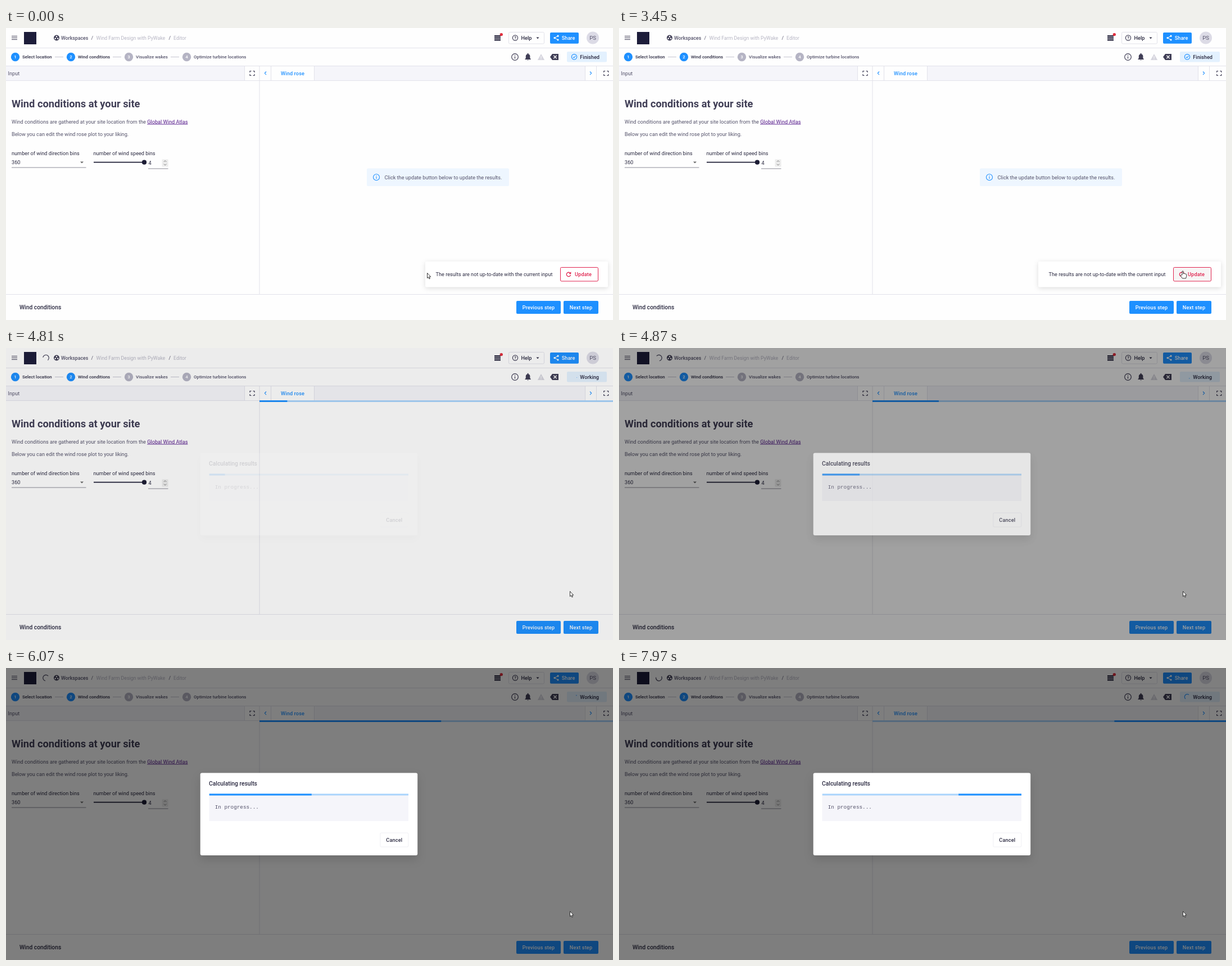
An HTML page for the animation above (8000 ms loop, 1080x519 px).

```html
<!DOCTYPE html>
<html lang="en">
<head>
<meta charset="utf-8">
<title>Wind conditions</title>
<style>
html, body { margin: 0; width: 100%; height: 100%; overflow: hidden; background: #fefefe; }
svg { display: block; width: 100vw; height: 100vh; --dim: 0; }
text { font: 400 9.17px Roboto, sans-serif; fill: #2a2940; white-space: pre; }
.m { font-weight: 500; }
.crumb { font-size: 8.75px; }
.step { font-size: 7.95px; font-weight: 500; }
.head { font-size: 10.3px; font-weight: 500; }
.para { font-size: 9.2px; }
.btn { font-weight: 500; letter-spacing: .13px; }
.mid { text-anchor: middle; }
.soft { fill: #55536b; }
.pale { fill: #b7b6c4; }
.white { fill: #fff; }
.blue { fill: #1e90ff; }
.red { fill: #e0234e; }
.dark { fill: #403e56; }
.line { fill: none; stroke: #403e56; stroke-width: 1.2; }
.edge { fill: none; stroke: #e2e2ea; }
.bline { fill: none; stroke: #1e90ff; stroke-width: 1.1; }
.track { fill: #a9d4fc; }
#shade { opacity: calc(.5 * var(--dim)); }
#modal { opacity: var(--dim); }
#card { filter: drop-shadow(0 7px 8px #0002); }
#toast { filter: drop-shadow(0 2px 4px #0002); }
</style>
</head>
<body>
<svg viewBox="0 0 1080 519" preserveAspectRatio="none">
  <rect width="1080" height="519" fill="#fefefe"/>

  <!-- header -->
  <path class="line" d="M10 14.5h10M10 17.5h10M10 20.5h10"/>
  <rect x="32" y="7" width="22" height="22" fill="#1d1d3a"/>
  <circle class="dark" cx="90" cy="17.5" r="5"/>
  <g class="white"><circle cx="90" cy="15.2" r="1.3"/><circle cx="87.8" cy="18.8" r="1.3"/><circle cx="92.2" cy="18.8" r="1.3"/></g>
  <text class="crumb m soft" x="98" y="20.7">Workspaces</text>
  <text class="crumb soft" x="151.5" y="20.7">/</text>
  <text class="crumb pale" x="160.5" y="20.7">Wind Farm Design with PyWake</text>
  <text class="crumb soft" x="289.5" y="20.7">/</text>
  <text class="crumb pale" x="298" y="20.7">Editor</text>
  <path fill="none" stroke="#2a2940" stroke-width="2.4" d="M869 14.3h11M869 17.8h11M869 21.3h11"/>
  <circle cx="881.3" cy="11.6" r="2.7" fill="#e0303f"/>
  <rect class="edge" x="894.5" y="7.5" width="63" height="20.5" rx="2"/>
  <circle class="line" cx="906" cy="17.5" r="4.6"/>
  <text class="m mid" x="906" y="20.2" style="font-size:7.5px">?</text>
  <text class="m" x="916.5" y="20.8">Help</text>
  <path fill="#2a2940" d="M943.5 16.5h5l-2.500 2.700z"/>
  <rect class="blue" x="968" y="8" width="51" height="19.8" rx="2"/>
  <path fill="none" stroke="#fff" d="M982 14.2l-6 3.4 6 3.4"/>
  <g class="white"><circle cx="976" cy="17.6" r="1.6"/><circle cx="982" cy="14.2" r="1.6"/><circle cx="982" cy="21" r="1.6"/></g>
  <text class="m white" x="988.8" y="20.8">Share</text>
  <circle cx="1044" cy="17.5" r="11" fill="#dcdbe6"/>
  <text class="mid soft" x="1044" y="21" style="font-size:9.6px">PS</text>
  <path class="edge" d="M0 35.5H1080M0 67.5H1080"/>

  <!-- stepper -->
  <path fill="none" stroke="#c4c3cf" d="M87 51.5h15M190 51.5h15M293 51.5h15"/>
  <g class="blue"><circle cx="16.5" cy="51.5" r="7.7"/><circle cx="115.5" cy="51.5" r="7.7"/></g>
  <g fill="#b5b4c4"><circle cx="218.5" cy="51.5" r="7.7"/><circle cx="321.5" cy="51.5" r="7.7"/></g>
  <text class="step mid white" x="16.5" y="54.4">1</text>
  <text class="step mid white" x="115.5" y="54.4">2</text>
  <text class="step mid white" x="218.5" y="54.4">3</text>
  <text class="step mid white" x="321.5" y="54.4">4</text>
  <text class="step" x="29" y="54.4">Select location</text>
  <text class="step" x="128" y="54.4">Wind conditions</text>
  <text class="step soft" x="231" y="54.4">Visualize wakes</text>
  <text class="step soft" x="334" y="54.4">Optimize turbine locations</text>
  <circle class="line" cx="905.5" cy="51.5" r="5.8"/>
  <path class="line" d="M905.5 50.5v4M905.5 48v1.3"/>
  <path class="dark" d="M923.5 56v-1l1.3-1.3v-3.4q0-3.2 2.8-3.9v-.6a1 1 0 0 1 2 0v.6q2.8.7 2.8 3.9v3.4l1.3 1.3v1zM927.3 56.7h2.5q-1.2 2-2.5 0z"/>
  <path fill="#d6d5de" d="M952 46l6.2 11h-12.4z"/>
  <path stroke="#fff" d="M952 50v3.5M952 54.5v1.3"/>
  <path class="dark" d="M972 46h11v11h-11l-4-5.5z"/>
  <path stroke="#fff" stroke-width="1.3" d="M974.3 48.8l5.4 5.4M979.7 48.8l-5.4 5.4"/>
  <rect x="998" y="42" width="71" height="18.5" rx="2" fill="#e3f1fe"/>
  <text class="m" id="status" x="1021.3" y="54.7">Finished</text>

  <!-- panel bars -->
  <path fill="#f5f5fa" d="M0 68h425v25H0zM549 68h481v25H549z"/>
  <path class="edge" d="M0 93.5H1080M451 68V473M424.5 68v25M471.5 68v25M548.5 68v25M1030.5 68v25M1050.5 68v25M0 473.5H1080"/>
  <text class="soft" x="3.5" y="83.8">Input</text>
  <path id="full" class="line" d="M434 79v-2.5h2.5M439.5 76.5h2.5v2.5M442 82v2.5h-2.5M436.5 84.5h-2.5v-2.5"/>
  <use href="#full" x="629.7"/>
  <path class="bline" d="M463 77.5l-2.7 2.8 2.7 2.8M1039 77.5l2.7 2.8-2.7 2.8"/>
  <text class="btn blue" x="489" y="83.8">Wind rose</text>

  <!-- input form -->
  <text class="dark" x="10" y="141" style="font-size:18.3px;font-weight:700">Wind conditions at your site</text>
  <text class="para soft" x="10" y="169.6">Wind conditions are gathered at your site location from the <tspan fill="#551a8b" text-decoration="underline">Global Wind Atlas</tspan></text>
  <text class="para soft" x="10" y="191.6">Below you can edit the wind rose plot to your liking.</text>
  <text x="10" y="226.3">number of wind direction bins</text>
  <text x="155.5" y="226.3">number of wind speed bins</text>
  <text x="10" y="241.8">360</text>
  <path fill="#666" d="M132 237.5h6l-3 3z"/>
  <path fill="none" stroke="#8b8a96" d="M10 248h132.5M253 250h35.5"/>
  <path stroke="#1d1d35" stroke-width="1.8" d="M156 238.7h90"/>
  <circle cx="246" cy="238.7" r="4.1" fill="#1d1d35"/>
  <text x="253.5" y="242.8">4</text>
  <rect x="277.5" y="233.5" width="11" height="13" fill="#ececec"/>
  <path fill="none" stroke="#777" stroke-width=".9" d="M280.8 238l2.3-2.3 2.3 2.3M280.8 241.7l2.3 2.3 2.3-2.3"/>

  <!-- footer -->
  <text class="head" x="24" y="500.2">Wind conditions</text>
  <rect class="blue" x="908" y="485" width="79" height="23" rx="2"/>
  <rect class="blue" x="992" y="485" width="62" height="23" rx="2"/>
  <text class="btn mid white" x="947.5" y="499.8">Previous step</text>
  <text class="btn mid white" x="1023" y="499.8">Next step</text>

  <g id="idle">
    <g class="bline"><circle cx="1011" cy="51.3" r="4.7"/><path d="M1008.8 51.3l1.7 1.7 3-3.3"/></g>
    <rect x="642" y="249.5" width="253" height="31.5" rx="2" fill="#eef6ff"/>
    <circle class="bline" cx="659" cy="265.3" r="5.5"/>
    <path class="bline" d="M659 264.5v3.6M659 262.2v1.2"/>
    <text class="soft" x="673.5" y="268.5">Click the update button below to update the results.</text>
    <rect id="toast" x="746" y="415" width="325" height="45.5" rx="2" fill="#fff"/>
    <text x="764.5" y="441.3">The results are not up-to-date with the current input</text>
    <rect id="update" x="986.5" y="425.5" width="67" height="24.5" rx="2" stroke="#e0234e" fill="#fff"/>
    <path fill="none" stroke="#e0234e" stroke-width="1.3" d="M1003.9 435.6a3.7 3.7 0 1 0 .7 3.3"/>
    <path class="red" d="M1005.3 433.2v4h-4z"/>
    <text class="btn red" x="1012" y="441.3">Update</text>
  </g>

  <g id="busy">
    <path id="turn" class="line" stroke-linecap="round"/>
    <circle id="arc" class="bline" cx="1011" cy="51.3" r="4.7" pathLength="126.9"/>
    <g class="bar" data-x="451" data-w="629" transform="translate(0 93)"></g>
  </g>

  <rect id="shade" width="1080" height="519"/>

  <g id="modal">
    <rect id="card" x="345.7" y="186.5" width="386.5" height="146.5" rx="3" fill="#fff"/>
    <text class="head" x="361" y="208.5">Calculating results</text>
    <rect x="361.5" y="226" width="354.5" height="46" fill="#f5f5fa"/>
    <g class="bar" data-x="361.7" data-w="354.3" transform="translate(0 223.5)"></g>
    <text class="soft" x="371.7" y="250.3" style="font:9.3px 'Liberation Mono',monospace">In progress...</text>
    <rect class="edge" x="665.8" y="293" width="50" height="25" rx="2" style="stroke:#efeff4"/>
    <text class="btn mid" x="690.8" y="308.9">Cancel</text>
  </g>

  <g id="cursor" fill="#fff" stroke="#222" stroke-width=".9" stroke-linejoin="round">
    <path id="arrow" d="M.5.5V9.6L2.5 7.8 4 11 5.4 10.3 4 7.2H6.7z"/>
    <path id="hand" d="M-1 7V1a1 1 0 0 1 2.1 0V4.5q1-.8 1.9.2 1.1-.6 1.8.5 1.6-.4 1.9 1V9.3L5.5 13H-.5L-3.8 8.5q-.4-1.6 1.3-1.4z"/>
  </g>
</svg>
<script>
const LOOP = 8000, BUSY = 4690, FADE = 4764, SPIN = 4768;
// Bursts of screen updates: first, last, count.
const BURSTS = [[30, 300, 4], [1760, 2150, 9], [2580, 3360, 19], [3410, 3450, 2],
  [4630, 4750, 3], [4810, 4930, 3], [4980, 5430, 10], [5480, 6070, 13], [6120, 6270, 4],
  [6300, 7090, 17], [7130, 7930, 17], [7970, 7970, 1]];
// Pointer path: time, x, y.
const PATH = [[0, 749, 435], [30, 620, 387], [120, 350, 284], [210, 291, 262], [300, 300, 266],
  [1760, 291, 271], [1950, 235, 273], [2150, 185, 265], [2540, 185, 265], [3360, 1036, 435],
  [3410, 1016, 433], [3450, 1003, 432], [LOOP, 1003, 432]];

const $ = id => document.getElementById(id);
const svg = document.querySelector('svg');
const show = (id, on) => $(id).style.display = on ? '' : 'none';
const clamp = (v, a = 0, b = 1) => Math.min(b, Math.max(a, v));

function bezier(x1, y1, x2, y2) {
  const at = (a, b, s) => 3 * (1 - s) ** 2 * s * a + 3 * (1 - s) * s * s * b + s ** 3;
  return x => {
    if (x <= 0 || x >= 1) return clamp(x);
    let lo = 0, hi = 1;
    for (let i = 0; i < 24; i++) {
      const s = (lo + hi) / 2;
      if (at(x1, x2, s) < x) lo = s; else hi = s;
    }
    return at(y1, y2, lo);
  };
}
const fade = bezier(.4, 0, .2, 1), inOut = bezier(.42, 0, .58, 1);
const long = bezier(.65, .815, .735, .395), short = bezier(.165, .84, .44, 1);

// Time of the latest screen update.
function held(t) {
  let r = 0;
  for (const [a, b, n] of BURSTS) {
    if (t < a) break;
    const gap = (b - a) / (n - 1) || 1;
    r = Math.min(b, a + Math.floor((t - a) / gap + 1e-6) * gap);
  }
  return r;
}

function pointer(t) {
  const i = Math.max(1, PATH.findIndex(p => p[0] >= t));
  const [a, ax, ay] = PATH[i - 1], [b, bx, by] = PATH[i];
  const k = inOut((t - a) / (b - a));
  return [ax + (bx - ax) * k, ay + (by - ay) * k];
}

const bars = [...document.querySelectorAll('.bar')].map(g => {
  const x = +g.dataset.x, w = +g.dataset.w;
  const [track, ...runs] = ['track', 'blue', 'blue'].map(name => {
    const r = document.createElementNS(svg.namespaceURI, 'rect');
    r.setAttribute('class', name);
    r.setAttribute('height', 3);
    return g.appendChild(r);
  });
  const span = (r, from, to) => {
    from = clamp(from);
    r.setAttribute('x', x + w * from);
    r.setAttribute('width', w * Math.max(0, clamp(to) - from));
  };
  span(track, 0, 1);
  return { runs, span };
});

function drawBars(e) {
  const phase = (v, ease) => v < 0 ? 0 : ease(v % 2100 / 1260);
  const p = phase(e, long), q = phase(e - 1135, short);
  for (const { runs, span } of bars) {
    span(runs[0], -.35 + 1.35 * p, 1.9 * p);
    span(runs[1], -2 + 3.07 * q, 1.08 * q);
  }
}

function drawArc(e) {
  const f = Math.max(0, e) % 1400 / 1400;
  const a = inOut(f * 2), b = inOut(f * 2 - 1);
  const off = 15 * a + 110 * b;
  const len = Math.min(1 + 99 * a, 126.9 - off);
  $('arc').setAttribute('stroke-dasharray', `${len} 200`);
  $('arc').setAttribute('transform', `rotate(${360 * (f + off / 126.9)} 1011 51.3)`);
}

function drawTurn(t) {
  const point = deg => {
    const r = deg * Math.PI / 180;
    return `${71 + 5.3 * Math.cos(r)} ${17.6 + 5.3 * Math.sin(r)}`;
  };
  const start = -105 + (t - 4930) / 2;
  $('turn').setAttribute('d', `M${point(start)}A5.3 5.3 0 1 1 ${point(start + 210)}`);
}

function draw(t) {
  const [x, y] = pointer(t), busy = t >= BUSY, over = !busy && x > 986;
  svg.style.setProperty('--dim', fade((t - FADE) / 225));
  show('idle', !busy);
  show('busy', busy);
  show('modal', busy);
  $('status').textContent = busy ? 'Working' : 'Finished';
  $('update').setAttribute('fill', over ? '#f7f5f5' : '#fff');
  show('hand', over);
  show('arrow', !over);
  $('cursor').setAttribute('transform', `translate(${x} ${y})`);
  if (busy) {
    drawBars(t - SPIN);
    drawArc(t - SPIN);
    drawTurn(t);
  }
}

const begin = performance.now();
function tick() {
  draw(held((performance.now() - begin) % LOOP));
  requestAnimationFrame(tick);
}
tick();
</script>
</body>
</html>
```
